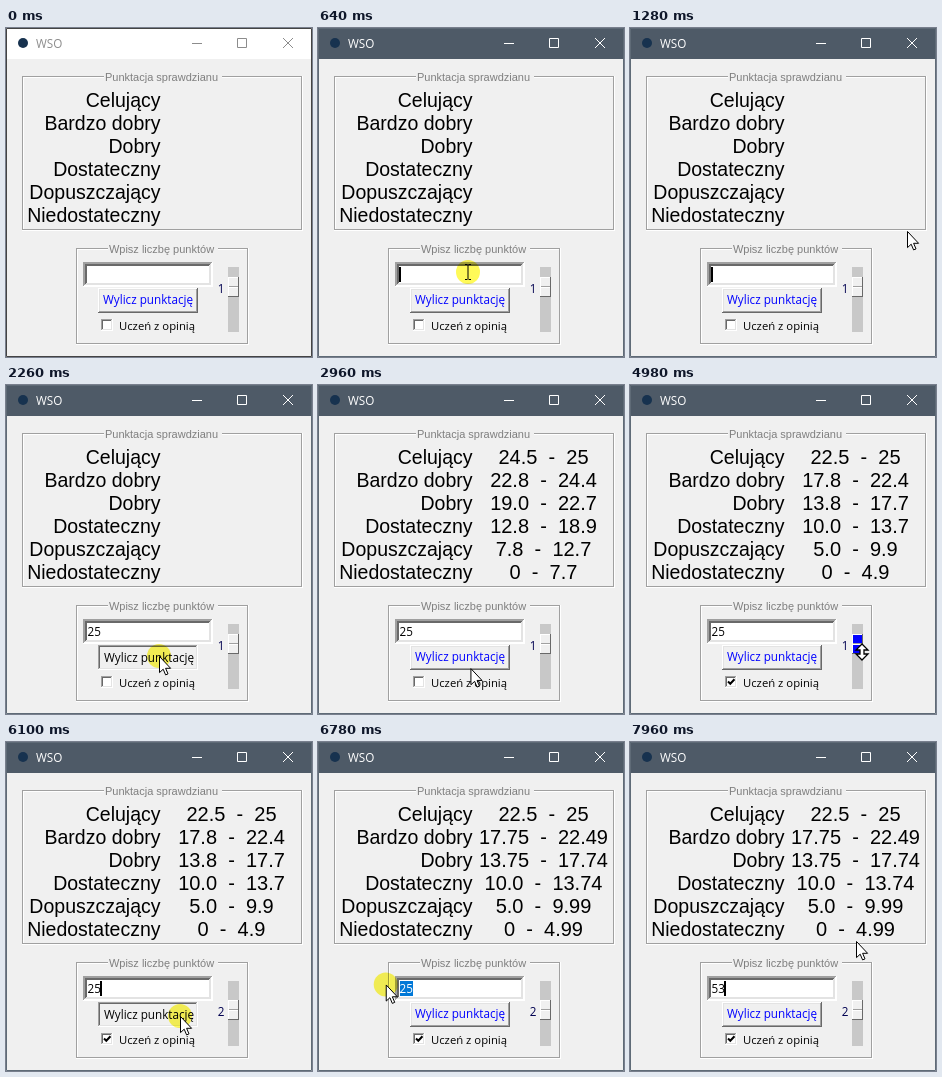
These frames come from a looping animation (306x329 px, 8 s). An HTML page:

```html
<!DOCTYPE html>
<html lang="pl">
<head>
<meta charset="utf-8">
<title>WSO</title>
<style>
html, body { margin: 0; width: 100%; height: 100%; overflow: hidden; background: #f0f0f0; }
svg { display: block; width: 306px; height: 329px; }
text { white-space: pre; }
.ui { font: 11.7px "Open Sans", "Noto Sans", sans-serif; }
.small { font: 11.3px "Open Sans", "Noto Sans", sans-serif; }
.name { font: 19.5px "Liberation Sans", Arial, sans-serif; }
.value { font: 20px "Liberation Sans", Arial, sans-serif; }
.cap { font: 11px "Liberation Sans", Arial, sans-serif; }
.mid { text-anchor: middle; }
.end { text-anchor: end; }
.crisp { shape-rendering: crispEdges; }
.press { fill: #fffa58; mix-blend-mode: multiply; }
</style>
</head>
<body>
<svg id="stage" viewBox="0 0 306 329"></svg>
<script>
const LOOP = 8000, MOVE = 320, CLICK = 180, KEY = 150;
const MAX = 25;
const NAMES = ["Celujący", "Bardzo dobry", "Dobry", "Dostateczny", "Dopuszczający", "Niedostateczny"];
const STRICT = [98, 91, 76, 51, 31, 0], RELAXED = [90, 71, 55, 40, 20, 0]; // percent needed per grade

// Where the pointer goes, and when it arrives.
const STOPS = {
  outside: { at: 0, x: 306, y: 300 },
  field: { at: 560, x: 150, y: 244, click: true },
  rest: { at: 1240, x: 277, y: 203 },
  count: { at: 2200, x: 153, y: 271, click: true },
  below: { at: 2900, x: 153, y: 283 },
  tick: { at: 3260, x: 107, y: 295, click: true },
  recount: { at: 4000, x: 157, y: 274, click: true },
  thumb: { at: 4900, x: 232, y: 267 },
  pull: { at: 5340, x: 231, y: 276, drag: true },
  refine: { at: 6000, x: 174, y: 274, click: true },
  digits: { at: 6580, x: 98, y: 245 },
  select: { at: 6940, x: 38, y: 240, drag: true },
  away: { at: 7500, x: 226, y: 199 }
};
const route = Object.values(STOPS);

const done = (stop, t) => t >= stop.at + CLICK;
const halfway = (stop, t) => t >= stop.at - MOVE / 2;
const between = (v, a, b) => v >= a && v < b;
const typed = (word, start, t) => word.slice(0, Math.max(0, Math.floor((t - start) / KEY) + 1));

const rect = (x, y, w, h, fill) =>
  `<rect class="crisp" x="${x}" y="${y}" width="${w}" height="${h}" fill="${fill}"/>`;
const text = (x, y, s, cls, fill = "#000") =>
  `<text x="${x}" y="${y}" class="${cls}" fill="${fill}">${s}</text>`;
const line = (d, stroke, width = 1) =>
  `<path d="${d}" fill="none" stroke="${stroke}" stroke-width="${width}"/>`;

// Nested one-pixel edges, outermost first, each [top-left, bottom-right].
function bevel(x, y, w, h, edges, fill) {
  return edges.map(([light, dark], i) =>
    rect(x + i, y + i, w - 2 * i, h - 2 * i, dark) +
    rect(x + i, y + i, w - 2 * i - 1, h - 2 * i - 1, light)
  ).join("") + rect(x + edges.length, y + edges.length, w - 2 * edges.length, h - 2 * edges.length, fill);
}
const OUTER = ["#a0a0a0", "#fff"], INNER = ["#696969", "#e3e3e3"];
const SUNKEN = [OUTER, INNER], RAISED = [["#fff", "#696969"], ["#e3e3e3", "#a0a0a0"]];

function frame(x, y, w, h, label, gap) {
  const mid = x + w / 2;
  return bevel(x, y, w, h, [["#a0a0a0", "#fff"], ["#fff", "#a0a0a0"]], "#f0f0f0") +
    rect(mid - gap / 2, y - 4, gap, 10, "#f0f0f0") + text(mid - 1, y + 5, label, "cap mid", "#7f7f7f");
}

function pointerAt(t) {
  const i = route.findLastIndex(s => t >= s.at - MOVE);
  const to = route[i], from = route[Math.max(0, i - 1)];
  const k = Math.min(1, (t - to.at + MOVE) / MOVE), ease = k * k * (3 - 2 * k);
  return {
    x: from.x + (to.x - from.x) * ease,
    y: from.y + (to.y - from.y) * ease,
    visible: i > 0,
    pressed: to.drag ? t < to.at + CLICK / 2 : to.click && between(t, to.at, to.at + CLICK)
  };
}

function titleBar(active) {
  const ink = active ? "#fff" : "#8c8c8c";
  return rect(0, 0, 306, 31, active ? "#4e5a67" : "#fff") +
    `<circle cx="17" cy="15" r="5" fill="#17324f"/>` + text(30, 20, "WSO", "ui", ink) +
    line("M186 15.5h10M231.5 10.5h9v9h-9zM277 10l10 10m0-10l-10 10", ink);
}

function range(limits, i, places) {
  const unit = 10 ** places;
  const low = j => Math.round(limits[j] * MAX / 100 * unit) / unit;
  const show = v => v ? v.toFixed(places).replace(/(\.\d)0$/, "$1") : "0";
  return show(low(i)) + "  -  " + (i ? show(low(i - 1) - 1 / unit) : MAX);
}

function results(t) {
  const limits = done(STOPS.recount, t) ? RELAXED : STRICT;
  const places = done(STOPS.refine, t) ? 2 : 1;
  return NAMES.map((name, i) => {
    const y = 79 + 23 * i;
    return text(154.5, y, name, "name end") +
      (done(STOPS.count, t) ? text(225.5, y, range(limits, i, places), "value mid") : "");
  }).join("");
}

function entry(t) {
  const retype = STOPS.away.at + 200;
  const value = t < retype ? typed("25", 1450, t) : typed("53", retype, t);
  const selected = halfway(STOPS.select, t) && t < retype;
  const caret = t > STOPS.field.at && (t < 1700 || !between(t % 900, 190, 490));
  return bevel(77, 234, 130, 25, [OUTER, ...SUNKEN, INNER], "#fff") +
    (selected ? rect(82, 239, 13, 15, "#0078d7") : "") +
    text(81.5, 251, value, "ui", selected ? "#fff" : "#000") +
    (caret ? rect(81 + (selected ? 0 : 6.5 * value.length), 239, 2, 15, "#000") : "");
}

function button(down) {
  const shift = down ? 1 : 0;
  return bevel(92, 260, 100, 25, down ? SUNKEN : RAISED, "#f0f0f0") +
    text(142 + shift, 276 + shift, "Wylicz punktację", "ui mid", down ? "#000" : "#00f");
}

function checkbox(on) {
  return bevel(95, 291, 12, 12, SUNKEN, "#fff") +
    (on ? line("M98 296.5l2.3 2.3l4.2-4.5", "#000", 2) : "") +
    text(113, 302, "Uczeń z opinią", "small");
}

function slider(t, hover) {
  const value = halfway(STOPS.pull, t) ? 2 : 1, y = 240 + 9 * value;
  return rect(222, 239, 11, 65, "#c8c8c8") + text(218.5, y + 16, value, "ui end", "#000050") +
    bevel(222, y, 11, 20, [RAISED[0]], hover ? "#00f" : "#f0f0f0") +
    rect(223, y + 9, 9, 1, "#a0a0a0") + rect(223, y + 10, 9, 1, "#fff");
}

const ARROW = `<path d="M.5.5V16.6L4.2 13.2L6.6 18.9L9 17.9L6.6 12.3H11.6Z" fill="#fff" stroke="#000"/>`;
const BEAM = line("M-3-7.5h2.5M.5-7.5H3M0-7V7M-3 7.5h2.5M.5 7.5H3", "#000");
const RESIZE = `<path d="M0-8L6-2H2V2H6L0 8L-6 2H-2V-2H-6Z" fill="#fff" stroke="#000" stroke-width="1.3"/>`;

function cursor({ x, y, visible, pressed }, onSlider) {
  if (!visible) return "";
  const onField = between(x, 79, 205) && between(y, 236, 257);
  return `<g transform="translate(${x} ${y})">` + (onSlider ? RESIZE : onField ? BEAM : ARROW) + "</g>";
}

const stage = document.getElementById("stage");
const frames = frame(16, 48, 281, 155, "Punktacja sprawdzianu", 118) +
  frame(70, 220, 173, 97, "Wpisz liczbę punktów", 110);

function draw(now) {
  const t = now % LOOP, p = pointerAt(t);
  const active = t >= STOPS.field.at;
  const onSlider = between(p.x, 221, 233) && between(p.y, 238, 304);
  const onButton = between(p.x, 92, 192) && between(p.y, 260, 285);
  stage.innerHTML = rect(0, 0, 306, 329, "#f0f0f0") + titleBar(active) + frames + results(t) +
    entry(t) + button(p.pressed && onButton) + checkbox(done(STOPS.tick, t)) + slider(t, onSlider) +
    line("M.5.5h305v328h-305z", active ? "#5f6b77" : "#444") +
    (p.pressed ? `<circle class="press" cx="${p.x}" cy="${p.y}" r="12"/>` : "") +
    cursor(p, onSlider);
  requestAnimationFrame(draw);
}
draw(0);
</script>
</body>
</html>
```
